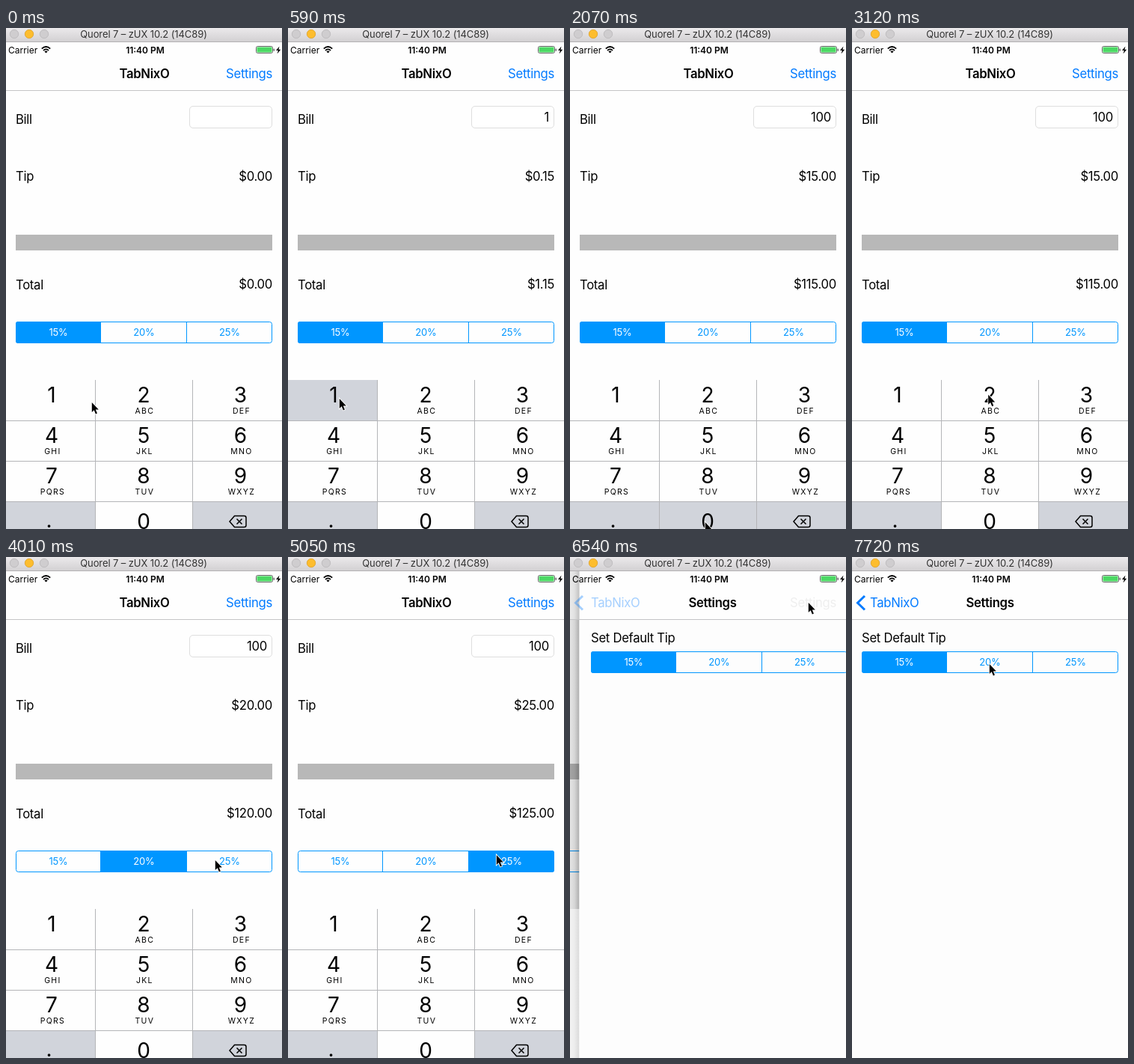
Recreate the animation shown at these times as an HTML page. Size 369 by 669 pixels, loop 8 s.

```html
<!DOCTYPE html>
<html lang="en">
<head>
<meta charset="utf-8">
<title>Tip calculator</title>
<style>
html, body { margin: 0; width: 100%; height: 100%; overflow: hidden; background: #fefefe }
svg { display: block; font: 16.7px Inter, Roboto, sans-serif; letter-spacing: -.3px }
.mid { text-anchor: middle }
.end { text-anchor: end }
.bold { font-weight: 600; letter-spacing: -.3px }
.link { fill: #007aff }
.seg { font-size: 13px; letter-spacing: -.2px; text-anchor: middle }
.bar { font-size: 13px; letter-spacing: -.1px; text-anchor: middle; fill: #333 }
.status { font-size: 12px; letter-spacing: 0 }
.digit { font-size: 28px; letter-spacing: 0; text-anchor: middle }
.sub { font-size: 10.5px; letter-spacing: 1.3px; text-anchor: middle }
</style>
</head>
<body>
<svg id="stage" width="369" height="669" viewBox="0 0 369 669"></svg>
<script>
const stage = document.getElementById('stage');
const LOOP = 8000, STEP = 148.7, LEAD = 12.6, LAST = 52;
const APP = 'TabNixO', BLUE = '#0096ff', KEY_GRAY = '#d1d4db';

// Pointer stops: [step, x, y]
const stops = [
  [0, 114, 499], [3, 68, 494], [5, 68, 494], [8, 150, 635], [10, 180, 659],
  [16, 180, 659], [24, 182, 410], [27, 279, 404], [33, 279, 404],
  [34, 278, 397], [40, 319, 54], [41, 318, 60], [47, 318, 60], [52, 183, 142]
];

const text = (s, x, y, cls = '', extra = '') => `<text x="${x}" y="${y}" class="${cls}" ${extra}>${s}</text>`;
const rect = (x, y, w, h, fill, extra = '') => `<rect x="${x}" y="${y}" width="${w}" height="${h}" fill="${fill}" ${extra}/>`;
const path = (d, stroke, width = 1, fill = 'none') => `<path d="${d}" stroke="${stroke}" stroke-width="${width}" fill="${fill}"/>`;
const money = v => '$' + v.toFixed(2);

function pointer(n) {
  let i = 0;
  while (i < stops.length - 2 && n > stops[i + 1][0]) i++;
  const [a, x, y] = stops[i], [b, u, v] = stops[i + 1];
  const k = (n - a) / (b - a), e = k * k * (3 - 2 * k);
  const arrow = 'M.8 1V14L3.7 11.3 5.9 16.4 7.9 15.5 5.8 10.6H9.8Z';
  return `<g transform="translate(${x + (u - x) * e} ${y + (v - y) * e})">` +
    path(arrow, '#fff', 1.8) + path(arrow, 'none', 0, '#000') + '</g>';
}

function segments(y, selected) {
  const edges = [126.5, 241.5], centers = [70, 184.5, 299];
  const shape = [
    `M126.5 ${y}H16a3 3 0 0 0-3 3v23a3 3 0 0 0 3 3H126.5Z`,
    `M126.5 ${y}H241.5v29H126.5Z`,
    `M241.5 ${y}H353a3 3 0 0 1 3 3v23a3 3 0 0 1-3 3H241.5Z`
  ][selected];
  return path(shape, 'none', 0, BLUE) +
    rect(13.5, y + .5, 342, 28, 'none', `rx="3" stroke="${BLUE}"`) +
    path(edges.map(x => `M${x} ${y}v29`).join(''), BLUE) +
    ['15%', '20%', '25%'].map((s, i) =>
      text(s, centers[i], y + 19, 'seg', `fill="${i === selected ? '#fff' : BLUE}"`)).join('');
}

function chrome() {
  const dot = (x, fill, edge) => `<circle cx="${x}" cy="8" r="5.7" fill="${fill}" stroke="${edge}" stroke-width=".8"/>`;
  return rect(0, 0, 369, 18, 'url(#top)') + rect(0, 18, 369, 1, '#b3b1b3') +
    dot(11, '#cfcdcf', '#b9b7b9') + dot(31, '#fdbd2e', '#dfa023') + dot(51, '#cfcdcf', '#b9b7b9') +
    text('Quorel 7 – zUX 10.2 (14C89)', 184, 13, 'bar') +
    text('Carrier', 3, 33.5, 'status') +
    path('M47.8 27.6Q53.5 22.4 59.2 27.6M50 30Q53.5 26.8 57 30', '#000', 1.7) +
    path('M51.4 31.4Q53.5 29.7 55.6 31.4L53.5 33.6Z', 'none', 0, '#000') +
    text('11:40 PM', 186, 33.5, 'status mid', 'font-weight="600"') +
    rect(334.5, 24.5, 22, 9, '#fff', 'rx="2" stroke="#666"') +
    rect(335.5, 25.5, 20, 7, '#4cd964', 'rx=".8"') + rect(357.6, 27.5, 1.4, 3.5, '#666', 'rx=".7"') +
    path('M365.5 24.5L361 30H363.8L362.6 34.5 367.2 28.8H364.4Z', 'none', 0, '#000');
}

function keypad(pressed) {
  const centers = [61, 184, 313.5];
  const letters = ['', 'ABC', 'DEF', 'GHI', 'JKL', 'MNO', 'PQRS', 'TUV', 'WXYZ'];
  let out = rect(0, 470, 369, 199, '#fefefe') +
    rect(0, 633, 119, 36, KEY_GRAY) + rect(250, 633, 119, 36, KEY_GRAY);
  if (pressed === 1) out += rect(0, 470, 119, 54, KEY_GRAY);
  if (pressed === 0) out += rect(120, 633, 129, 36, KEY_GRAY);
  out += path('M119.5 470V669M249.5 470V669M0 524.5H369M0 578.5H369M0 632.5H369', '#b4b5b8');
  letters.forEach((s, i) => {
    const x = centers[i % 3], y = 500 + 54 * Math.floor(i / 3);
    out += text(i + 1, x, y, 'digit') + text(s, x + 1.4, y + 15, 'sub');
  });
  return out + text('0', 184, 669, 'digit') + text('.', 57.5, 667, 'digit') +
    path('M305.5 651.5H318.5Q321 651.5 321 654V664Q321 666.5 318.5 666.5H305.5L299 659Z', '#000', 1.5) +
    path('M308.5 655.5L315.5 662.5M315.5 655.5L308.5 662.5', '#000', 1.5);
}

function calculator(n) {
  const bill = n < 3 ? 0 : n < 11 ? 1 : n < 14 ? 10 : 100;
  const choice = n < 23 ? 0 : n < 29 ? 1 : 2;
  const tip = bill * (15 + 5 * choice) / 100;
  const pressed = n === 3 || n === 4 ? 1 : n === 11 || n === 12 || n === 14 ? 0 : -1;
  return text(APP, 185, 67, 'bold mid') + text('Settings', 356, 67, 'link end') +
    rect(0, 83, 369, 1, '#c4c4c6') +
    text('Bill', 13, 127.6) + text('Tip', 13, 203.6) + text('Total', 13, 348.6) +
    rect(245.5, 104.5, 110, 29, '#fff', 'rx="4.5" stroke="#dedede"') +
    text(bill || '', 349, 125, 'end') +
    text(money(tip), 356, 203.6, 'end') + text(money(bill + tip), 356, 348.4, 'end') +
    rect(13, 276, 343, 21, '#b8b8b8') + segments(392, choice) + keypad(pressed);
}

function settings(n) {
  const shift = n === 44 ? 15 : n === 45 ? 3 : 0;
  const edge = Math.max(0, shift - 2.5), shown = 1 - shift / 23;
  const under = shift ? rect(0, 276, edge, 21, '#b8b8b8') +
    path(`M0 392.5H${edge}M0 420.5H${edge}`, BLUE) +
    rect(0, 19, edge, 65, 'url(#shade)', 'opacity=".75"') +
    rect(0, 84, edge, 386, 'url(#shade)') +
    rect(0, 470, edge, 199, 'url(#shade)', 'opacity=".45"') : '';
  return under + rect(edge, 84, 369, 585, '#fdfdfd') +
    rect(0, 83, 369, 1, '#c4c4c6') +
    `<g opacity="${shown}">` + path('M17 52L7.5 61.2 17 70.5', '#007aff', 3) +
    text(APP, 24 + shift * .27, 67, 'link') + '</g>' +
    text('Settings', 184.5 + shift * .4, 67, 'bold mid') +
    (shift ? text('Settings', 356, 67, 'end', `opacity="${shift * .004}"`) : '') +
    `<g transform="translate(${shift})">` + text('Set Default Tip', 13, 113.6) + segments(126, 0) + '</g>';
}

const defs = `<defs>
  <linearGradient id="top" x2="0" y2="1"><stop stop-color="#ebe9eb"/><stop offset="1" stop-color="#d3d1d3"/></linearGradient>
  <linearGradient id="shade"><stop stop-opacity=".1"/><stop offset=".5" stop-opacity=".16"/><stop offset="1" stop-opacity=".32"/></linearGradient>
</defs>`;

let drawn = -1;
function frame() {
  const t = performance.now() % LOOP;
  const n = Math.min(LAST, Math.floor((t + LEAD) / STEP));
  if (n !== drawn) {
    stage.innerHTML = defs + rect(0, 0, 369, 669, '#fefefe') +
      (n < 44 ? calculator(n) : settings(n)) + chrome() + pointer(n);
    drawn = n;
  }
  requestAnimationFrame(frame);
}
frame();
</script>
</body>
</html>
```
